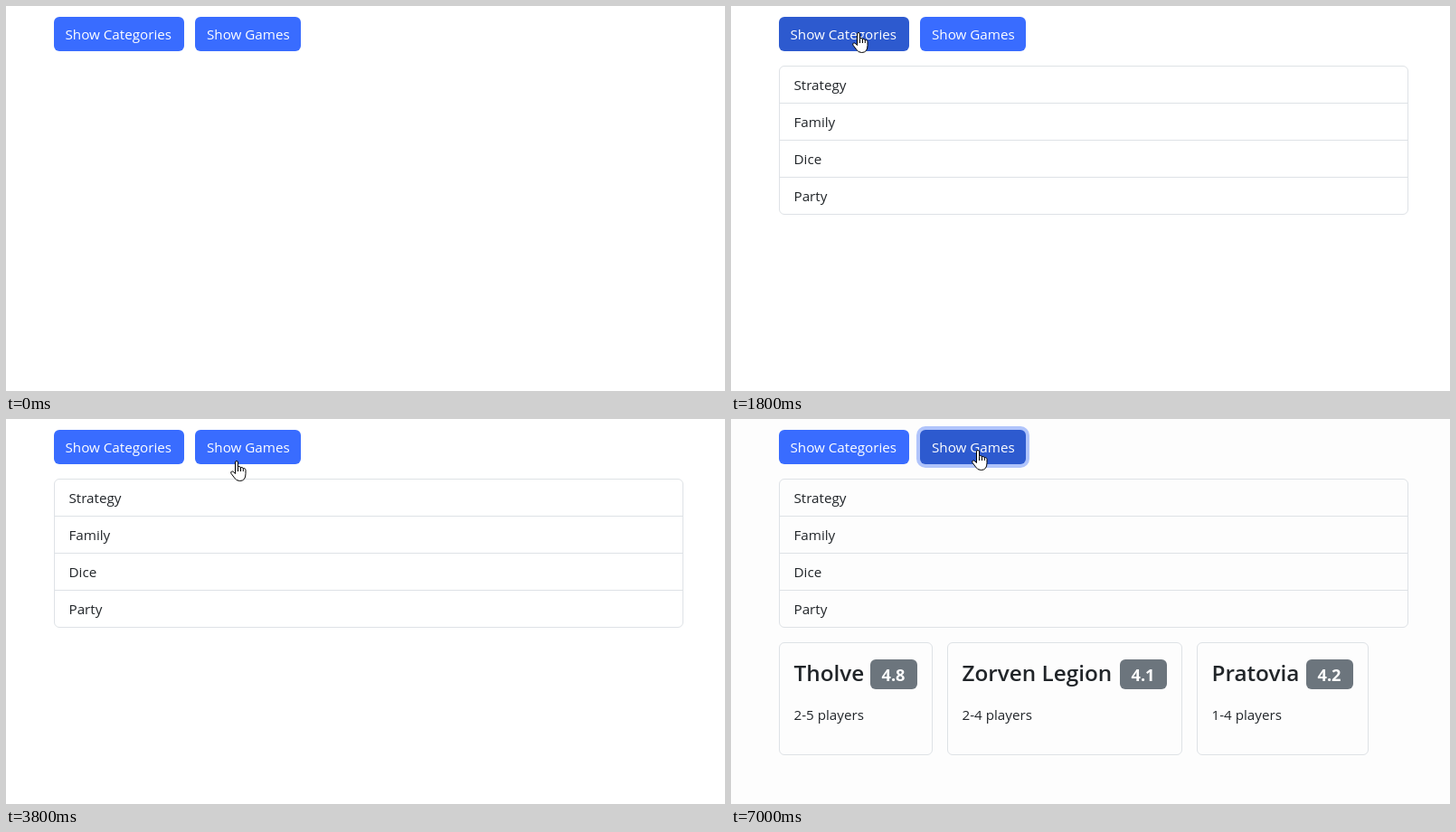
An HTML page for the animation above (7.1 s loop, 795 px wide and 426 px high).

```html
<!DOCTYPE html>
<html lang="en">
<head>
<meta charset="utf-8">
<title>Board games</title>
<style>
  html, body { margin: 0; width: 100%; height: 100%; overflow: hidden; background: #fff; }
  svg { display: block; width: 795px; height: 426px; background: #fff; }
  text { font: 15.2px "Open Sans", "Noto Sans", sans-serif; fill: #212529; }
  .button { fill: #396cff; }
  .button + text, .badge + text { fill: #fff; }
  .line { fill: none; stroke: #dee2e6; }
  .name { font-size: 24.3px; font-weight: 600; }
  .badge { fill: #6c757d; }
  .badge + text { font-size: 18.2px; font-weight: 700; }
  #ring { fill: #b0c4fb; }
  #ring, #list, #cards, #arrow, #hand { visibility: hidden; }
  .pointer { fill: #fff; stroke: #000; stroke-linejoin: round; }
</style>
</head>
<body>
<svg id="stage" viewBox="0 0 795 426">
  <rect id="ring" x="205" y="8" width="125" height="46" rx="10"/>
  <rect id="categoriesButton" class="button" x="53" y="12" width="144" height="38" rx="6"/>
  <text x="65.5" y="37">Show Categories</text>
  <rect id="gamesButton" class="button" x="209" y="12" width="117" height="38" rx="6"/>
  <text x="222" y="37">Show Games</text>

  <g id="list">
    <rect class="line" x="53.5" y="66.5" width="695" height="164" rx="5.5"/>
    <path class="line" d="M54 107.5H748m-694 41H748m-694 41H748"/>
  </g>
  <g id="cards"></g>

  <g id="pointer" class="pointer">
    <path id="arrow" d="M.5 .8V16.3L4 12.9 6.7 18.9 9 17.9 6.4 12.1H11.3Z"/>
    <g id="hand">
      <path d="M-1.5 13V2Q-1.5 .5 0 .5T1.5 2V7.5Q2 6.5 3 6.5T4.5 8Q5 7.3 6 7.5T7.3 9Q8 8.3 9 8.8T10 10.5V14.5Q10 22.5 3.5 22.5Q-.5 22.5-2.5 19L-6.1 14.2Q-6.8 12.8-5.5 12Q-4.2 11.5-3 13L-1.5 14.5Z"/>
      <path d="M1.5 7.5V12M4.5 8V12M7.3 9V12" fill="none"/>
    </g>
  </g>
</svg>
<script>
const LOOP = 7100, TICK = 100;
const byId = id => document.getElementById(id);

byId("list").innerHTML += ["Strategy", "Family", "Dice", "Party"]
  .map((label, row) => `<text x="69.5" y="${93 + 41 * row}">${label}</text>`).join("");

function card(x, width, name, rating, players) {
  const right = x + width;
  byId("cards").innerHTML += `
    <rect class="line" x="${x + .5}" y="247.5" width="${width - 1}" height="124" rx="5.5"/>
    <text class="name" x="${x + 16.5}" y="290">${name}</text>
    <rect class="badge" x="${right - 69}" y="266" width="52" height="33" rx="6"/>
    <text x="${right - 56.5}" y="290">${rating}</text>
    <text x="${x + 16.5}" y="333">${players} players</text>`;
}
card(53, 170, "Tholve", "4.8", "2-5");
card(239, 260, "Zorven Legion", "4.1", "2-4");
card(515, 190, "Pratovia", "4.2", "1-4");

// Holds each value from its time until the next one.
function hold(id, property, changes) {
  const frames = changes.map(([time, value]) =>
    ({ offset: time / LOOP, [property]: value, easing: "step-end" }));
  frames.push({ ...frames.at(-1), offset: 1 });
  byId(id).animate(frames, { duration: LOOP, iterations: Infinity });
}

const show = (id, ...times) => hold(id, "visibility", [
  [0, "hidden"],
  ...times.map((time, i) => [time, i % 2 ? "hidden" : "visible"]),
]);

// Fades a button to its hover shade and back, one third or so per tick.
function hover(id, enter, leave = LOOP) {
  const changes = [];
  for (let time = 0; time < LOOP; time += TICK) {
    const amount = Math.min(1, Math.max(0, (time - enter) / 150))
                 - Math.min(1, Math.max(0, (time - leave) / 150));
    changes.push([time, `rgb(${57 - 12 * amount} ${108 - 18 * amount} ${255 - 48 * amount})`]);
  }
  hold(id, "fill", changes);
}

// Moves the pointer along joined quadratic curves, one step per tick.
function travel(from, strokes) {
  const changes = [[0, from]];
  for (const { start, end, bend, to } of strokes) {
    const origin = from;
    for (let time = start; time <= end; time += TICK) {
      const u = (time - start) / (end - start), v = 1 - u;
      changes.push([time, [0, 1].map(axis =>
        v * v * origin[axis] + 2 * u * v * bend[axis] + u * u * to[axis])]);
    }
    from = to;
  }
  hold("pointer", "transform", changes.map(([time, [x, y]]) =>
    [time, `translate(${Math.round(x)}px, ${Math.round(y)}px)`]));
}

show("list", 1800);
show("cards", 4700);
show("ring", 7000);
show("arrow", 500, 1000, 3400, 3800);
show("hand", 1000, 3400, 3800);
hold("stage", "backgroundColor", [[0, "#fff"], [4700, "#fdfdfd"]]);
hover("categoriesButton", 1000, 3350);
hover("gamesButton", 3900);
travel([32, 74], [
  { start: 500, end: 1200, bend: [118, 50], to: [141, 29] },
  { start: 2800, end: 3600, bend: [130, 52], to: [222, 53] },
  { start: 3600, end: 3800, bend: [240, 53], to: [255, 46] },
  { start: 3900, end: 4200, bend: [268, 37], to: [273, 34] },
]);
</script>
</body>
</html>
```
